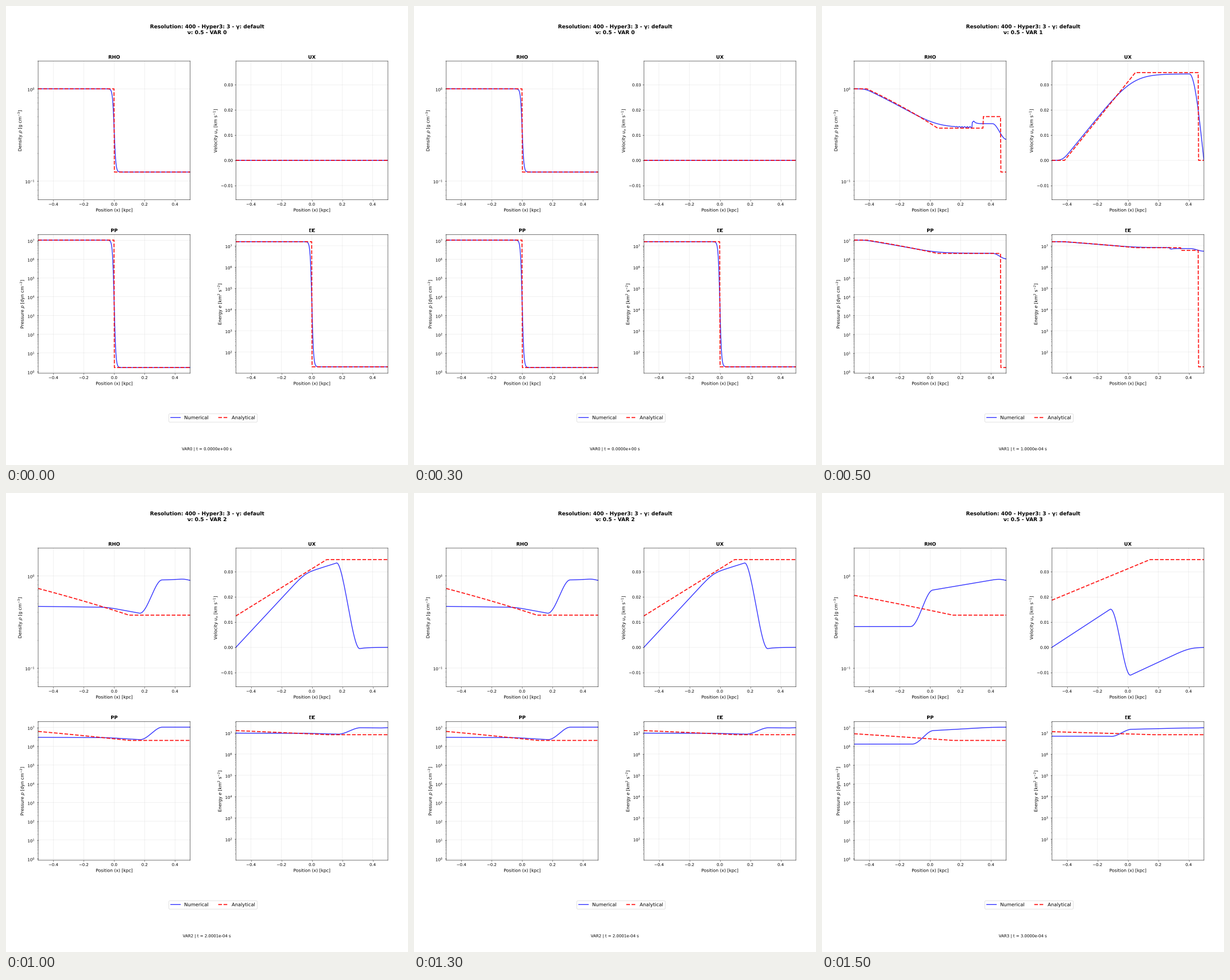
A matplotlib script that plays this animation: 700 px wide and 800 px high, repeating every 2 s.

```python
import numpy as np
import matplotlib.pyplot as plt
from matplotlib import patheffects
from matplotlib.animation import FuncAnimation

# Unhinted, unsnapped drawing keeps text and lines at sub-pixel positions
plt.rcParams["text.hinting"] = "none"
plt.rcParams["path.snap"] = False
plt.rcParams["path.effects"] = [patheffects.Normal()]

X = np.linspace(-0.5, 0.5, 400)
TIMES = [0, 1e-4, 2.0001e-4, 3e-4]

# Shock tube, gamma = 5/3: left and right states
P_L, P_R = 1.04e7, 1.67
RHO_L, RHO_R = 1.0, 0.125
C_L = np.sqrt(5 / 3 * P_L)      # sound speed on the left
U_STAR = 0.8372 * C_L           # speed of the contact
U_SCALE = 1e-5
LOG_P = np.log10(P_L)


def energy(p, rho):
    return 1.5 * p / rho


def analytical(t):
    """Exact solution: rarefaction fan, contact and strong shock."""
    if t == 0:
        rho = np.where(X < 0, RHO_L, RHO_R)
        p = np.where(X < 0, P_L, P_R)
        return rho, 0 * X, p, energy(p, rho)
    u = np.clip(0.75 * (X / t + C_L), 0, U_STAR)
    rho = (1 - u / (3 * C_L)) ** 3
    p = P_L * rho ** (5 / 3)
    rho = np.where(X > U_STAR * t, 4 * RHO_R, rho)
    ahead = X > 4 / 3 * U_STAR * t
    rho[ahead], p[ahead], u[ahead] = RHO_R, P_R, 0
    return rho, u * U_SCALE, p, energy(p, rho)


def bend(d, width):
    """Ramp max(d, 0) with a rounded corner."""
    return width * np.logaddexp(0, d / width)


def span(a, b):
    return np.clip((X - a) / (b - a), 0, 1)


def front(a, b, left, right):
    """Smeared shock joining two profiles between a and b."""
    s = span(a, b)
    return left + (right - left) * s * s * (3 - 2 * s)


def state(log_rho, u, log_p):
    rho, p = 10 ** log_rho, 10 ** log_p
    return rho, u, p, energy(p, rho)


def initial():
    step = (1 + np.tanh(X / 0.011)) / 2
    return state(step * np.log10(RHO_R), 0 * X,
                 LOG_P + step * np.log10(P_R / P_L))


def expanding():
    """Rounded fan, contact with ringing, shock meeting the right wall."""
    u = bend(0.03434 - 0.075 * bend(0.03 - X, 0.066), 0.001)
    fan = 3 * np.log10(1 - u / U_SCALE / (3 * C_L))
    ringing = 0.009 * span(0.14, 0.275) * np.sin(2 * np.pi * (X - 0.275) / 0.0175)
    spike = 0.03 * np.exp(-np.abs(X - 0.286) / 0.012)
    left = X < 0.275
    log_rho = np.where(left, fan + ringing, front(0.41, 0.5, -0.378, -0.548) + spike)
    log_p = np.where(left, LOG_P + 5 / 3 * fan, front(0.41, 0.5, 6.316, 6.02))
    return state(log_rho, u * np.cos(np.pi / 2 * span(0.405, 0.5)), log_p)


# Density of the gas piled up at the right wall
WALL = -0.0445 + 0.1 * bend(X - 0.35, 0.015) - 0.5 * bend(X - 0.46, 0.01)


def reflected():
    """Shock on its way back from the right wall."""
    corner = bend(X + 0.045, 0.022)
    behind = -0.3315 - 0.02 * (X + 0.5) - 0.29 * corner
    u = front(0.162, 0.316, 0.065 * (X + 0.5) - 0.046 * corner,
              -0.0005 * np.exp(-(X - 0.316) / 0.045))
    return state(front(0.165, 0.315, behind, WALL), u,
                 front(0.167, 0.317, LOG_P + 0.01 + 5 / 3 * behind, 7.015))


def returning():
    """Shock past the middle, gas on the right flowing back."""
    depth = bend(0.409 - X, 0.03)
    return state(front(-0.128, 0.016, -0.55, WALL - 0.28 * depth),
                 front(-0.118, 0.019, 0.0395 * (X + 0.5), -0.0282 * depth),
                 front(-0.118, 0.02, 6.112, 7.014 - 0.467 * depth))


NUMERICAL = [initial(), expanding(), reflected(), returning()]
ANALYTICAL = [analytical(t) for t in TIMES]

# Title, y label, y limits, log scale
PANELS = [
    ("RHO", r"Density $\rho$ [g cm$^{-3}$]", (0.0625, 2), True),
    ("UX", r"Velocity $u_x$ [km s$^{-1}$]", (-0.01566, 0.03944), False),
    ("PP", r"Pressure $p$ [dyn cm$^{-2}$]", (P_R / 2, 2 * P_L), True),
    ("EE", r"Energy $e$ [km$^2$ s$^{-2}$]", (10.02, 3.4e7), True),
]

fig, axes = plt.subplots(2, 2, figsize=(14, 16), dpi=50)
fig.subplots_adjust(left=0.08, right=0.95, top=0.88, bottom=0.2,
                    wspace=0.3, hspace=0.25)

lines = []
for ax, (title, label, limits, log) in zip(axes.flat, PANELS):
    if log:
        ax.set_yscale("log")
    num, = ax.plot(X, X + 1, "b-", lw=2, alpha=0.8, label="Numerical")
    ana, = ax.plot(X, X + 1, "r--", lw=2.5, alpha=0.9, label="Analytical")
    lines.append((num, ana))
    ax.set_xlim(-0.5, 0.5)
    ax.set_ylim(limits)
    ax.set_title(title, fontsize=12, fontweight="bold")
    ax.set_xlabel("Position (x) [kpc]", fontsize=11)
    ax.set_ylabel(label, fontsize=11)
    ax.grid(True, alpha=0.3)

fig.legend(handles=lines[0], loc="center", bbox_to_anchor=(0.515, 0.1025),
           ncol=2, fontsize=12)
heading = fig.suptitle("", y=0.96, fontsize=13, fontweight="bold")
footer = fig.text(0.5, 0.03, "", ha="center", va="bottom", fontsize=10)


def update(i):
    for (num, ana), y_num, y_ana in zip(lines, NUMERICAL[i], ANALYTICAL[i]):
        num.set_ydata(y_num)
        ana.set_ydata(y_ana)
    heading.set_text(f"Resolution: 400 - Hyper3: 3 - γ: default\nν: 0.5 - VAR {i}")
    footer.set_text(f"VAR{i} | t = {TIMES[i]:.4e} s")
    return []


anim = FuncAnimation(fig, update, frames=len(TIMES), interval=500,
                     repeat=True, repeat_delay=0)
plt.show()
```
